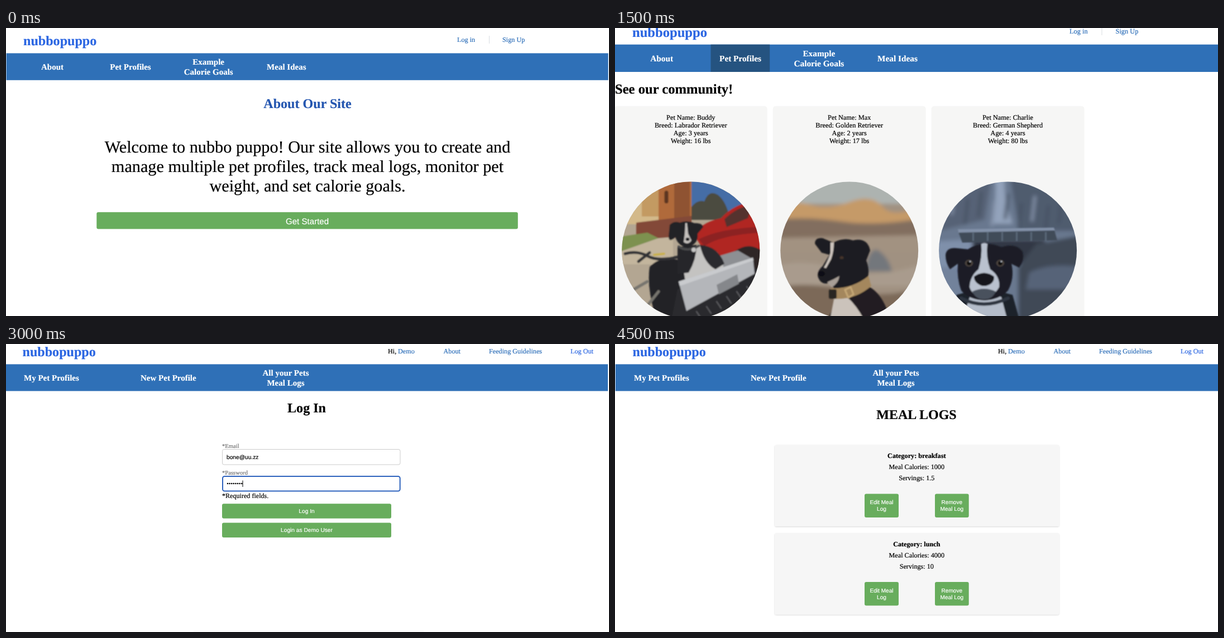
These frames come from a looping animation (1080x518 px, 6000 ms). An HTML page:

```html
<!DOCTYPE html>
<html lang="en">
<head>
<meta charset="utf-8">
<title>Pet meal tracker tour</title>
<style>
  html, body { margin: 0; width: 100%; height: 100%; overflow: hidden; background: #fff; }
  svg { display: block; width: 100%; height: 100%; }
  text {
    font-family: "Liberation Serif", Times, serif; white-space: pre;
    stroke-width: 0.2; text-rendering: geometricPrecision;
  }
  .sans { font-family: "Liberation Sans", Arial, sans-serif; }
  .bold { font-weight: bold; }
</style>
</head>
<body>
<svg id="stage" viewBox="0 0 1080 518" preserveAspectRatio="none">
  <defs>
    <filter id="soft"><feGaussianBlur stdDeviation="3.5"/></filter>
    <filter id="fine"><feGaussianBlur stdDeviation="0.8"/></filter>
    <filter id="shade" x="-5%" y="-5%" width="110%" height="115%">
      <feDropShadow dx="0" dy="1" stdDeviation="1.2" flood-opacity="0.16"/>
    </filter>
  </defs>
</svg>
<script>
const NS = "http://www.w3.org/2000/svg";
const stage = document.getElementById("stage");
const SCENE_MS = 1500;
const BRAND = "nubbopuppo";
const BLUE = "#2f70b7", LINK = "#2e6fb9", LOGO = "#2b66e2", GREEN = "#68ad5d";

function add(parent, tag, attrs, content) {
  const el = document.createElementNS(NS, tag);
  for (const key in attrs) el.setAttribute(key, attrs[key]);
  if (content !== undefined) el.textContent = content;
  parent.appendChild(el);
  return el;
}

const rect = (g, x, y, w, h, fill, more) =>
  add(g, "rect", { x, y, width: w, height: h, fill, ...more });
const path = (g, d, fill, more) => add(g, "path", { d, fill, ...more });
const oval = (g, cx, cy, rx, ry, fill) => add(g, "ellipse", { cx, cy, rx, ry, fill });
const stroke = (g, d, color, width) =>
  path(g, d, "none", { stroke: color, "stroke-width": width, "stroke-linecap": "round" });

function text(g, str, x, y, size, fill = "#000", cls = "", anchor = "start") {
  const attrs = { x, y, "font-size": size, fill, stroke: fill, class: cls, "text-anchor": anchor };
  return add(g, "text", attrs, str);
}
const center = (g, str, x, y, size, fill, cls) => text(g, str, x, y, size, fill, cls, "middle");

function button(g, x, y, w, h, lines, size, baseline, lead = 11.6) {
  rect(g, x, y, w, h, GREEN, { rx: 3 });
  lines.forEach((line, i) => center(g, line, x + w / 2, baseline + i * lead, size, "#fff", "sans"));
}

const scene = () => add(stage, "g", { display: "none" });

// Header for visitors
function guestHeader(g, top, o) {
  text(g, BRAND, 31, top - 14.5, o.logo, LOGO, "bold");
  text(g, "Log in", o.login, top - 20.5, o.link, LINK);
  rect(g, o.rule, top - 31, 1, 14, "#d9dde2");
  text(g, "Sign Up", o.signup, top - 20.5, o.link, LINK);
  const y = top + 0.4 - o.lift;
  rect(g, o.left, y, o.right - o.left, o.height, BLUE);
  if (o.active) rect(g, 171.5, y, 105.7, o.height, "#255380");
  const tab = (str, x, dy) => center(g, str, x, top + dy, o.tab, "#fff", "bold");
  const [a, b, c, d] = o.tabs;
  tab("About", a, 29.5);
  tab("Pet Profiles", b, 29.5);
  tab("Example", c, 21);
  tab("Calorie Goals", c, 38.5);
  tab("Meal Ideas", d, 29.5);
}

// Header for members
function memberHeader(g, dx, left, right) {
  text(g, BRAND, 29.5 + dx, 22, 24.1, LOGO, "bold");
  text(g, "Hi,", 684 + dx, 16.5, 12.2);
  text(g, "Demo", 702 + dx, 16.5, 12.2, LINK);
  text(g, "About", 783.5 + dx, 16.5, 12.2, LINK);
  text(g, "Feeding Guidelines", 865 + dx, 16.5, 12.2, LINK);
  text(g, "Log Out", 1011 + dx, 16.5, 12.2, LOGO);
  rect(g, left, 36.4, right - left, 48.2, BLUE);
  text(g, "My Pet Profiles", 32 + dx, 65.7, 15, "#fff", "bold");
  text(g, "New Pet Profile", 241 + dx, 65.7, 15, "#fff", "bold");
  center(g, "All your Pets", 501 + dx, 57, 15, "#fff", "bold");
  center(g, "Meal Logs", 501 + dx, 74.5, 15, "#fff", "bold");
  rect(g, 336, 515, 412, 3, "#fbfbfb");
}

function photo(g, id, cx, draw) {
  const clip = add(stage.querySelector("defs"), "clipPath", { id });
  add(clip, "circle", { cx, cy: 400, r: 123.5 });
  const frame = add(g, "g", { "clip-path": `url(#${id})` });
  const back = add(frame, "g", { filter: "url(#soft)" });
  const front = add(frame, "g", { filter: "url(#fine)" });
  draw(back, front);
}

function crateDog(b, f) {
  rect(b, -10, 250, 290, 290, "#b3a692");
  // Street, building and car
  rect(f, 0, 265, 82, 88, "#d3b98a");
  rect(f, 136, 265, 130, 75, "#456da6");
  path(f, "M137 322Q148 308 160 312Q168 290 184 300Q200 312 206 345H137Z", "#4c4b41");
  rect(f, 78, 265, 59, 82, "#b06a3a");
  rect(f, 48, 265, 30, 74, "#c39a62");
  rect(f, 106, 265, 28, 80, "#8f5230");
  stroke(f, "M92 296V312", "#5b3622", 7);
  path(f, "M38 350L137 338V376L38 380Z", "#834a38");
  path(f, "M5 376L58 368L78 378L5 404Z", "#7d914f");
  path(f, "M5 404L78 378L104 376V425H5Z", "#c3b59d");
  path(f, "M144 376Q146 352 190 342Q214 314 262 308V430H178Z", "#b02623");
  path(f, "M196 344Q218 322 246 318L238 342L200 358Z", "#55302f");
  path(f, "M150 380Q190 360 262 358V368Q190 372 160 392Z", "#8c2120");
  path(f, "M214 402Q238 384 262 400V440H216Z", "#2d2527");
  // Motorcycle
  path(f, "M62 430Q80 408 118 418L150 530H76Q56 470 62 430Z", "#232427");
  path(f, "M112 470L262 430V530H100Z", "#2c2c2f");
  stroke(f, "M18 406Q40 400 58 410T112 412M42 420L62 404", "#303134", 5);
  stroke(f, "M70 408L88 406", "#c9b04a", 4);
  stroke(f, "M34 470L58 456M48 512L78 474", "#77746e", 5);
  // Dog
  path(f, "M166 416L220 400L244 414L170 450Z", "#8d8f93");
  path(f, "M126 402Q162 384 184 404Q200 430 194 460L130 470Q118 430 126 402Z", "#c4c3c1");
  path(f, "M152 390Q184 392 196 424L180 434Q160 424 152 390Z", "#2a2a2d");
  path(f, "M112 394L146 390Q146 416 132 440L112 442Z", "#26262a");
  path(f, "M98 354Q106 346 116 350Q130 345 142 351Q156 350 158 358L148 370Q150 388 131 394Q114 394 108 376Q96 388 96 374Z", "#222328");
  path(f, "M126 351L129 351L131 370L137 382Q131 391 123 385L125 370Z", "#c4c0bd");
  oval(f, 130, 380, 3.5, 3, "#17181a");
  stroke(f, "M114 393Q130 404 150 392", "#48494b", 4);
  oval(f, 141, 399, 4, 4, "#c5c5c4");
  // Crate
  path(f, "M114 456L247 413L250 442L128 509Z", "#b4b6ba");
  path(f, "M114 456L247 413L248 418L116 464Z", "#c9cbce");
  path(f, "M182 462L219 443L222 460L186 479Z", "#85878b");
  for (let i = 0; i < 6; i++)
    stroke(f, `M${146 + i * 18} ${510 - i * 9}l8 12`, "#5f5f63", 2);
}

function beachDog(b, f) {
  rect(b, 275, 250, 290, 290, "#a09181");
  rect(b, 275, 250, 290, 66, "#adb3b0");
  path(b, "M275 324Q320 308 350 318T420 313T480 322T565 312V352H275Z", "#c59a68");
  path(b, "M275 346Q340 338 405 348T565 340V380H275Z", "#826e5f");
  path(b, "M275 378L565 372V402H275Z", "#a29281");
  path(b, "M275 430Q340 412 400 434T565 420V464H275Z", "#a99b8d");
  path(b, "M275 468Q350 454 420 472T565 460V540H275Z", "#7b6959");
  path(b, "M448 438Q452 402 468 398Q490 410 496 438Z", "#73777b");
  path(f, "M402 480Q436 454 458 467Q484 484 494 530H378Z", "#211f20");
  path(f, "M392 488Q410 476 424 492Q440 510 448 530H384Z", "#cbc3bb");
  path(f, "M358 388Q358 376 372 378L391 386Q410 376 426 382Q452 376 457 400L450 418Q460 444 446 462Q424 484 396 474L386 458Q370 464 364 449Q360 439 372 428L384 408L370 404Z", "#1f1e20");
  path(f, "M386 386L392 386Q392 402 387 416L378 432L374 431Q382 418 386 404Z", "#cdc5be");
  path(f, "M380 457Q392 452 402 446Q400 460 388 466Z", "#a79e96");
  oval(f, 370, 442, 6, 5, "#111113");
  oval(f, 406, 413, 3.5, 2.6, "#45352b");
  path(f, "M386 468Q424 470 454 446L459 464Q430 490 390 487Z", "#a4875d");
  stroke(f, "M412 471L422 466L427 479L418 485Z", "#c6a877", 3);
  rect(f, 383, 470, 14, 17, "#2a2724", { rx: 3 });
}

function bridgeDog(b, f) {
  rect(b, 560, 250, 290, 290, "#69788f");
  path(b, "M560 260H676L662 345L560 370Z", "#566276");
  path(b, "M706 260H850V365H724Z", "#4f5b6e");
  path(b, "M680 260H698Q694 305 712 352H672Q686 310 680 260Z", "#93a3bb");
  for (let i = 0; i < 9; i++)
    stroke(b, `M${608 + i * 24} ${292 + (i * 17) % 30}l-5 42`, i % 3 ? "#465264" : "#8391a8", 5);
  path(b, "M560 385L640 380V440H560Z", "#7f90aa");
  rect(b, 640, 380, 130, 42, "#303844");
  path(b, "M755 388L850 370V540H722V430Z", "#3f4857");
  path(b, "M560 430H650V540H560Z", "#72829b");
  path(b, "M742 440Q780 420 850 432V470H736Z", "#566478");
  path(f, "M614 364L786 360L792 382L622 386Z", "#414b59");
  path(f, "M614 362L786 359L788 364L615 368Z", "#8291a8");
  for (let x = 640; x < 780; x += 26) rect(f, x, 367, 3, 16, "#596677");
  path(f, "M612 480Q660 465 712 480L726 530H596Z", "#1d222a");
  path(f, "M636 482Q662 470 692 484L704 530H620Z", "#b4bcc9");
  path(f, "M592 408Q594 394 612 396L632 398Q660 380 692 394Q718 386 730 402Q734 418 724 431L710 424Q716 450 704 472Q690 488 662 490Q632 488 620 472Q612 450 614 424L600 434Q592 422 592 408Z", "#1b1f28");
  path(f, "M656 388Q662 385 667 388Q664 412 672 434Q690 446 688 466Q678 484 660 485Q640 482 635 466Q636 446 651 434Q658 412 656 388Z", "#b9c1ce");
  path(f, "M643 447Q661 434 679 447Q680 460 664 464H658Q643 459 643 447Z", "#12151a");
  path(f, "M640 474Q661 464 682 474Q676 488 661 488Q646 488 640 474Z", "#4a515d");
  for (const x of [634, 690]) {
    oval(f, x, 423, 7, 6, "#4f4640");
    oval(f, x, 423, 4, 4, "#090b0e");
    oval(f, x + 2, 420, 1.5, 1.2, "#c6ced9");
  }
  stroke(f, "M620 486Q660 507 704 486", "#2e3540", 6);
}

function aboutScene() {
  const g = scene();
  guestHeader(g, 45, {
    logo: 24.1, link: 12.2, tab: 15, login: 808, rule: 865, signup: 889,
    left: 0.6, right: 1078.6, height: 48.4, lift: 0, tabs: [83, 223, 362.7, 502.3]
  });
  center(g, "About Our Site", 540, 144.3, 24.1, "#2456b0", "bold");
  ["Welcome to nubbo puppo! Our site allows you to create and",
   "manage multiple pet profiles, track meal logs, monitor pet",
   "weight, and set calorie goals."
  ].forEach((line, i) => center(g, line, 540, 224 + i * 35, 30.25));
  button(g, 162.3, 331.2, 754.5, 30.4, ["Get Started"], 15.1, 352.5);
  return g;
}

function petsScene() {
  const g = scene();
  guestHeader(g, 30, {
    logo: 24.6, link: 12.4, tab: 15.3, login: 814, rule: 871.5, signup: 896.5,
    left: 0, right: 1080, height: 49.3, lift: 0.7, tabs: [83.7, 224.5, 365.3, 506], active: true
  });
  text(g, "See our community!", 0, 118.3, 24.6, "#000", "bold");
  const pets = [
    ["Buddy", "Labrador Retriever", 3, 16, crateDog],
    ["Max", "Golden Retriever", 2, 17, beachDog],
    ["Charlie", "German Shepherd", 4, 80, bridgeDog]
  ];
  pets.forEach(([name, breed, age, weight, draw], i) => {
    const cx = 135.8 + i * 283.9;
    rect(g, cx - 137, 140.5, 274, 400, "#f6f6f5", { rx: 5 });
    [`Pet Name: ${name}`, `Breed: ${breed}`, `Age: ${age} years`, `Weight: ${weight} lbs`]
      .forEach((line, n) => center(g, line, cx, 164.5 + n * 14.2, 12.3));
    photo(g, "round" + i, cx, draw);
  });
  return g;
}

function loginScene() {
  const g = scene();
  memberHeader(g, 0, 0, 1078);
  center(g, "Log In", 538.5, 123, 24.1, "#000", "bold");
  text(g, "*Email", 387, 186.7, 10.65, "#757575");
  rect(g, 387.5, 189.5, 318.5, 27.5, "#fff", { rx: 3, stroke: "#cbcbcb" });
  text(g, "bone@uu.zz", 395, 206.6, 10.2, "#000", "sans");
  text(g, "*Password", 387, 234.7, 10.65, "#757575");
  rect(g, 388, 238, 317.7, 26.5, "#fff", { rx: 3.5, stroke: "#2d62bd", "stroke-width": 2 });
  for (let i = 0; i < 8; i++) oval(g, 397 + i * 3.6, 251, 1.35, 1.35, "#000");
  rect(g, 423.5, 245.5, 1, 11.5, "#000");
  text(g, "*Required fields.", 387, 276.7, 12.1);
  button(g, 387, 287.3, 303, 26.5, ["Log In"], 10.2, 304);
  button(g, 387, 321.5, 303, 26.5, ["Login as Demo User"], 10.2, 338.3);
  return g;
}

function mealsScene() {
  const g = scene();
  memberHeader(g, 2, 0.8, 1080);
  center(g, "MEAL LOGS", 540, 135, 24, "#000", "bold");
  [["breakfast", 1000, "1.5"], ["lunch", 4000, "10"]].forEach(([meal, calories, servings], i) => {
    const y = 181.5 + i * 158.6;
    rect(g, 286, y, 509.5, 146.5, "#f6f6f6", { rx: 3, filter: "url(#shade)" });
    center(g, `Category: ${meal}`, 540.3, y + 23.5, 12.2, "#000", "bold");
    center(g, `Meal Calories: ${calories}`, 540.3, y + 43.5, 12.2);
    center(g, `Servings: ${servings}`, 540.3, y + 63.5, 12.2);
    button(g, 447, y + 88, 61, 42.5, ["Edit Meal", "Log"], 10.15, y + 106.8);
    button(g, 573, y + 88, 60.7, 42.5, ["Remove", "Meal Log"], 10.15, y + 106.8);
  });
  return g;
}

const scenes = [aboutScene(), petsScene(), loginScene(), mealsScene()];

function show(ms) {
  const current = Math.floor(ms / SCENE_MS) % scenes.length;
  scenes.forEach((g, i) => g.setAttribute("display", i === current ? "inline" : "none"));
}

const start = performance.now();
function tick() {
  show(performance.now() - start);
  requestAnimationFrame(tick);
}
show(0);
requestAnimationFrame(tick);
</script>
</body>
</html>
```
